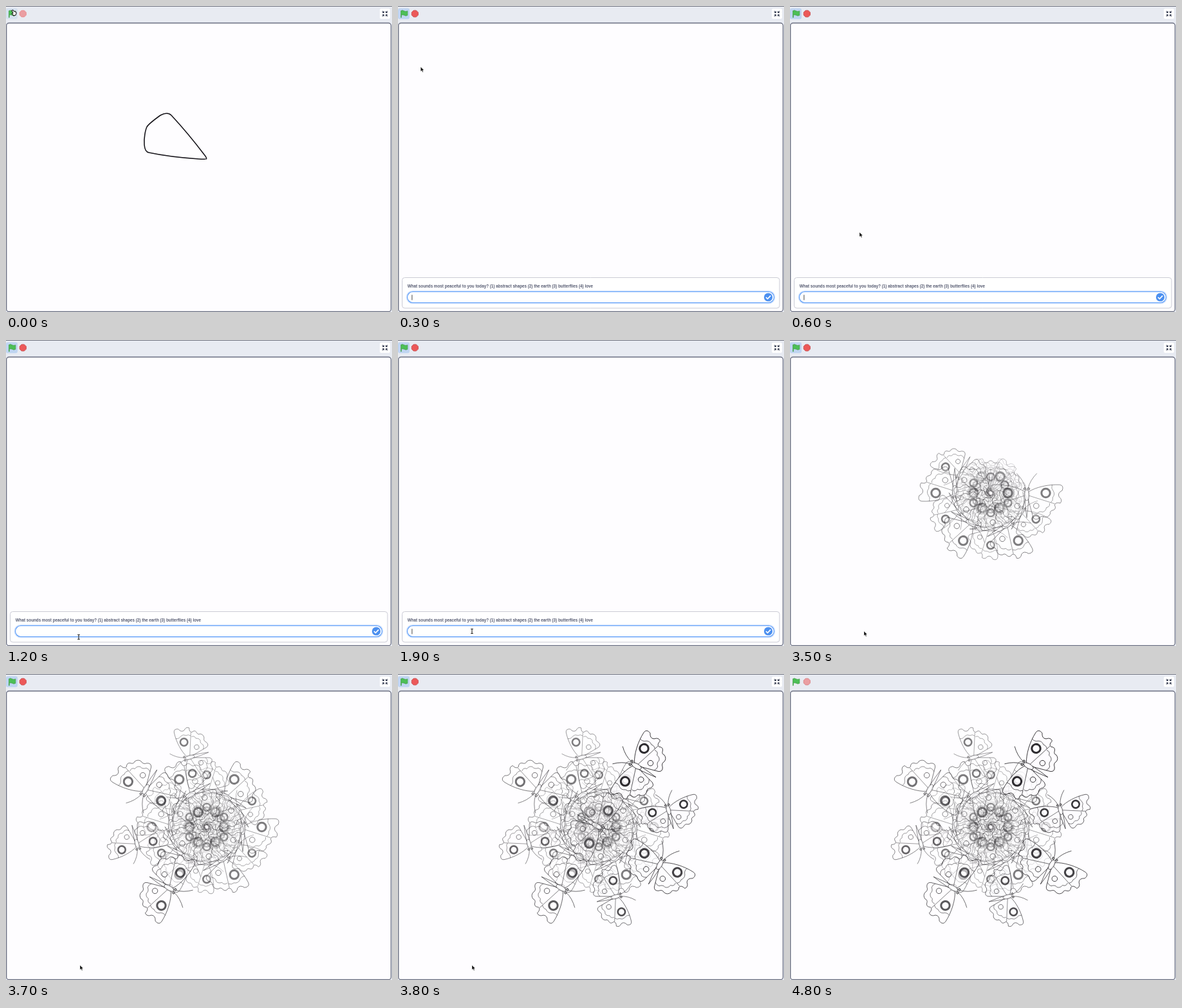
Write an HTML page with a canvas that moves like this. It is 600 px wide and 476 px high and loops after 5200 ms.

```html
<!DOCTYPE html>
<html lang="en">
<head>
<meta charset="utf-8">
<title>Butterfly mandala</title>
<style>
html, body { margin: 0; width: 100%; height: 100%; overflow: hidden; background: #e8ebf2; }
canvas { display: block; }
</style>
</head>
<body>
<canvas id="stage" width="600" height="476"></canvas>
<script>
const ctx = document.getElementById('stage').getContext('2d');
const LOOP = 5200, CX = 312, CY = 238, BIG = 0.985, SMALL = 0.84;
const FONT = '"Liberation Sans", Arial, sans-serif';
const QUESTION = 'What sounds most peaceful to you today? (1) abstract shapes (2) the earth (3) butterflies (4) love';

// One wing pair side, body axis on x = 0, head up
const wing = new Path2D('M3 -2C14 -9 34 -14 52 -13Q59 -12 56 -4Q48 0 51 6Q57 11 53 16Q45 14 44 19Q47 25 42 27Q36 28 37 33Q34 39 28 38Q23 35 19 40Q13 44 10 38L2 9Z');
const veins = new Path2D('M3 4L44 17M40 -13Q38 -7 42 -3Q45 2 41 7Q42 12 38 15M36 16Q37 22 31 23Q30 29 25 30Q20 28 16 33Q12 34 8 31');
const feeler = new Path2D('M2 -7Q5 -20 16 -31');
const abdomen = new Path2D('M-3 9Q-2 25 0 39Q2 25 3 9');
const blob = new Path2D('M312 237Q311 239 300 238Q255 235 222 228Q216 227 215 216C214 205 217 192 219 188Q222 183 240 170Q251 164 257 170Q283 198 308 231Q313 237 311 238');
const arrow = new Path2D('M0 0V7L1.7 5.6L2.9 8.3L4 7.8L2.9 5.2L5 5Z');
const hand = new Path2D('M-2 -2Q0 -4 1 -1L4 0Q6 2 4 5L1 6L-2 3L0 2Z');

function paint(path, fill, stroke, width = 1) {
  if (fill) { ctx.fillStyle = fill; ctx.fill(path); }
  if (stroke) { ctx.strokeStyle = stroke; ctx.lineWidth = width; ctx.stroke(path); }
}

function box(x, y, w, h, r, fill, stroke, width) {
  const p = new Path2D();
  p.roundRect(x, y, w, h, r);
  paint(p, fill, stroke, width);
}

function ellipse(x, y, rx, ry, fill, stroke, width) {
  const p = new Path2D();
  p.ellipse(x, y, rx, ry, 0, 0, Math.PI * 2);
  paint(p, fill, stroke, width);
}

function at(x, y, draw) {
  ctx.save();
  ctx.translate(x, y);
  draw();
  ctx.restore();
}

function butterfly(deg, dist, size, alpha) {
  const a = deg * Math.PI / 180, ink = '#1c1a1e';
  const veil = `rgba(254, 253, 255, ${alpha ** 1.5})`;
  at(CX + dist * Math.cos(a), CY + dist * Math.sin(a), () => {
    ctx.rotate(a);
    ctx.scale(size, size);
    ctx.globalAlpha = alpha;
    for (const side of [1, -1]) {
      ctx.save();
      ctx.scale(side, 1);
      paint(wing, veil, ink, 0.85);
      paint(veins, null, ink, 0.7);
      ellipse(30, 0, 6.8, 6.8, null, ink, 3.1);
      ellipse(15, 20.3, 4.3, 4.3, null, ink, 0.9);
      paint(feeler, null, ink, 0.8);
      ctx.restore();
    }
    paint(abdomen, veil, ink, 0.8);
    ellipse(0, 3.5, 3.8, 8.5, '#fefdff', ink, 0.8);
    for (const x of [-3, 3]) ellipse(x, -6.5, 1.8, 1.8, '#999', ink, 0.9);
  });
}

function mandala(count) {
  const size = deg => deg / 30 % 2 ? SMALL : BIG;
  for (let i = 0; i < 12; i++) butterfly(i * 30, 0, size(i * 30), 0.1 + i * 0.02);
  for (let i = 0; i < Math.min(count, 12); i++) {
    const deg = 210 - i * 30;
    butterfly(deg, 56, size(deg), 0.57);
  }
  for (let i = 0; i < count - 12; i++) {
    butterfly(255 - i * 45, 111.5, i % 2 ? BIG : SMALL, 0.57 + i * 0.05);
  }
}

function toolbar(state) {
  ctx.fillStyle = '#e8ebf2';
  ctx.fillRect(0, 0, 600, 476);
  ctx.fillStyle = '#70737f';
  ctx.fillRect(0, 0, 600, 1);
  if (state !== 'idle') box(0, 3.5, 18, 17, 3, state === 'run' ? '#bfd5f1' : '#d5e1ef');
  const flag = new Path2D('M4.5 7.5Q7 6 9.5 7.8Q12 9.2 14.8 7.8V14.5Q12 16 9.5 14.3Q7 13 5.2 14.3V18H4.5Z');
  paint(flag, '#4cbf56', '#45a04a', 0.8);
  const stop = new Path2D();
  for (let i = 0; i < 8; i++) {
    const a = (i + 0.5) * Math.PI / 4;
    stop.lineTo(26.3 + 5.5 * Math.cos(a), 12 + 5.5 * Math.sin(a));
  }
  stop.closePath();
  ctx.globalAlpha = state === 'run' ? 1 : 0.52;
  paint(stop, '#ec5959', state === 'hover' ? '#ec5959' : '#c94d50', 0.9);
  ctx.globalAlpha = 1;
  box(581, 4, 16, 16, 2.5, '#fff');
  at(589, 12, () => {
    for (let i = 0; i < 4; i++) {
      ctx.rotate(Math.PI / 2);
      paint(new Path2D('M4.2 4.2L1.8 1.8M1.6 4V1.6H4'), null, '#454b5e', 1.1);
    }
  });
  box(0.7, 26.5, 597.8, 449, 4, '#fefdff', '#686d7f', 1.3);
}

function prompt(t) {
  box(6.5, 422.5, 586.5, 47.5, 4, '#fff', '#cbccd5', 1);
  ctx.fillStyle = '#555a70';
  ctx.font = 'bold 6.29px ' + FONT;
  ctx.fillText(QUESTION, 14.7, 438);
  box(14.5, 444.5, 570, 17, 8.5, '#fff', '#d0e2fd', 4);
  box(14.5, 444.5, 570, 17, 8.5, '#fff', '#5b9cf8', 1.1);
  ellipse(575.5, 453, 6.6, 6.6, '#4c90f0');
  paint(new Path2D('M572 453.2L574.5 455.6L579.2 450.6'), null, '#fff', 1.7);
  const typed = t >= 2500;
  if (typed) {
    ctx.fillStyle = '#6b6f80';
    ctx.font = '6.2px ' + FONT;
    ctx.fillText('3', 21, 455.6);
  }
  if (typed ? t < 2700 : t < 1000 || t >= 1400) {
    ctx.fillStyle = '#333';
    ctx.fillRect(typed ? 25 : 21.4, 449.3, 0.9, 8.2);
  }
}

// Pointer stops: time, x, y
const stops = [[0, 11, 9], [200, 11, 9], [600, 108, 352], [1200, 113, 462], [1600, 114, 453],
  [1700, 114, 453], [1900, 115, 453], [4500, 115, 453], [4700, 9, 440]];

function pointer(t) {
  if (t > 4700) return;
  const i = Math.max(1, stops.findIndex(s => s[0] >= t));
  const [t0, x0, y0] = stops[i - 1], [t1, x1, y1] = stops[i];
  const k = (t - t0) / (t1 - t0);
  const x = x0 + (x1 - x0) * k, y = y0 + (y1 - y0) * k;
  at(x, y, () => {
    if (t <= 200) paint(hand, '#fff', '#222', 1.1);
    else if (y > 443 && t < 3300) {
      paint(new Path2D('M-1.8 -3.5H1.8M0 -3.5V3.5M-1.8 3.5H1.8'), null, '#222', 1.1);
    } else paint(arrow, '#111', '#fff', 0.3);
  });
}

function draw(now) {
  const t = Math.floor(now % LOOP / 100) * 100;
  toolbar(t < 100 ? 'hover' : t < 4100 ? 'run' : 'idle');
  if (t < 100) paint(blob, null, '#17151b', 1.6);
  else if (t >= 300 && t < 3500) prompt(t);
  else if (t >= 3500) {
    mandala(Math.min(20, 8 + (t - 3500) / 100 * 4));
    if (t >= 3800 && t < 4000) butterfly(120, 0, BIG, 0.65);
  }
  pointer(t);
}

const start = performance.now();
function tick() {
  draw(performance.now() - start);
  requestAnimationFrame(tick);
}
tick();
</script>
</body>
</html>
```
